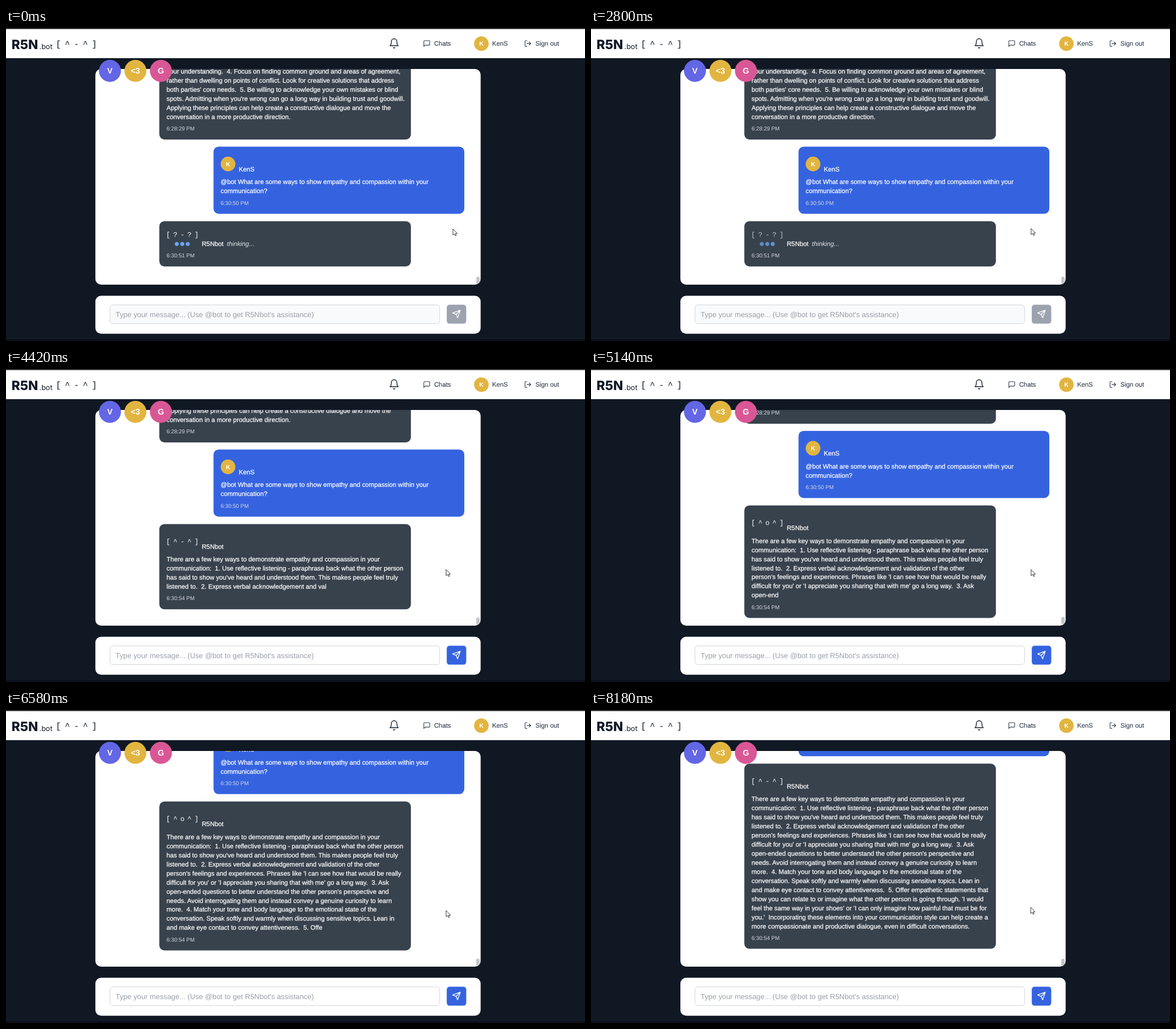
Animation, 1017 px wide and 550 px high, one loop 8.42 s. Source, as an HTML page:

```html
<!DOCTYPE html>
<html lang="en">
<head>
<meta charset="utf-8">
<title>Chat with a bot</title>
<style>
  html, body { margin: 0; width: 100%; height: 100%; overflow: hidden; background: #101823; }
  svg { display: block; }
  text { font: 11.25px "Liberation Sans", Arial, sans-serif; white-space: pre; text-rendering: geometricPrecision; }
  .light { fill: #fff; stroke: #fff; stroke-width: .25px; }
  .nav { fill: #374151; stroke: #374151; stroke-width: .15px; }
  .time { font-size: 9.65px; fill: #d5d9df; }
  .initial { font-weight: bold; fill: #fff; text-anchor: middle; }
  .face { font: 12.2px "Liberation Mono", "DejaVu Sans Mono", monospace; letter-spacing: -.09em; fill: #fff; }
  .icon { fill: none; stroke: #374151; stroke-width: 2; stroke-linecap: round; stroke-linejoin: round; }
</style>
</head>
<body>
<svg id="stage" width="1017" height="550" viewBox="0 0 1017 550">
  <defs>
    <clipPath id="panel"><rect x="157" y="72" width="676.7" height="379" rx="10"/></clipPath>
  </defs>
  <rect width="1017" height="550" fill="#101823"/>
  <rect y="547" width="1017" height="3" fill="#0a101a"/>
  <rect width="1017" height="53" fill="#fff"/>
  <rect width="1017" height="2" fill="#36383c"/>

  <text x="9.7" y="36.5" fill="#111827" style="font:800 22.6px Inter,sans-serif">R5N</text>
  <text x="58.5" y="36.5" fill="#111827" style="font:12.6px Inter,sans-serif">.bot</text>
  <text x="87.6" y="33" class="face" style="font-size:15.4px;fill:#111827">[ ^ - ^ ]</text>

  <g class="icon" transform="translate(672 17.3) scale(.81)">
    <path d="M6 8a6 6 0 0 1 12 0c0 7 3 9 3 9H3s3-2 3-9M10.3 21a1.94 1.94 0 0 0 3.4 0"/>
  </g>
  <g class="icon" transform="translate(732.2 20.5) scale(.57)">
    <path d="M21 15a2 2 0 0 1-2 2H7l-4 4V5a2 2 0 0 1 2-2h14a2 2 0 0 1 2 2z"/>
  </g>
  <text x="752" y="31" class="nav">Chats</text>
  <circle cx="835" cy="27.5" r="12.8" fill="#e2b540"/>
  <text x="835" y="31.2" class="initial" style="font-size:10.5px">K</text>
  <text x="854" y="31" class="nav">KenS</text>
  <g class="icon" transform="translate(910 20.6) scale(.56)">
    <path d="M9 21H5a2 2 0 0 1-2-2V5a2 2 0 0 1 2-2h4M16 17l5-5-5-5M21 12H9"/>
  </g>
  <text x="930" y="31" class="nav">Sign out</text>

  <g clip-path="url(#panel)">
    <rect x="157" y="72" width="677" height="379" fill="#fff"/>
    <rect id="thumb" x="826" y="437" width="6" height="13" rx="3" fill="#c4c6c9"/>
    <g id="feed">
      <g id="earlier">
        <rect x="269.3" y="-400" width="441.9" height="256.5" rx="9" fill="#38424d"/>
      </g>
      <g transform="translate(0 -131)">
        <rect x="364.5" width="440.5" height="118" rx="9" fill="#3563e0"/>
        <circle cx="390" cy="30.6" r="12.9" fill="#e2b540"/>
        <text x="390" y="34.2" class="initial" style="font-size:10.5px">K</text>
        <text x="409" y="43.5" class="light">KenS</text>
        <text x="377" y="66" class="light">@bot What are some ways to show empathy and compassion within your</text>
        <text x="377" y="82" class="light">communication?</text>
        <text x="377" y="102.3" class="time">6:30:50 PM</text>
      </g>
      <rect id="card" x="269.3" width="441.9" height="79.6" rx="9" fill="#38424d"/>
      <text id="face" x="281.3" class="face"></text>
      <text x="344" y="43.3" class="light">R5Nbot</text>
      <g id="thinking">
        <text x="388" y="43.3" fill="#e3e6ea" style="font-style:italic">thinking...</text>
        <g id="dots" fill="#69a6f5"></g>
      </g>
      <g id="reply"></g>
      <text id="stamp" x="282" class="time"></text>
    </g>
  </g>

  <g id="people"></g>

  <rect x="157" y="470.5" width="676.7" height="66.7" rx="10" fill="#fff"/>
  <rect id="field" x="182.7" y="486.6" width="579" height="32.8" rx="5" stroke="#d1d5db"/>
  <text x="192.5" y="507.5" fill="#9a9fa8" style="font-size:12.85px">Type your message... (Use @bot to get R5Nbot's assistance)</text>
  <rect id="send" x="774.2" y="486.2" width="34.2" height="33.4" rx="5"/>
  <g class="icon" style="stroke:#fff" transform="translate(783.2 494.6) scale(.67)">
    <path d="M22 2 15 22 11 13 2 9ZM22 2 11 13"/>
  </g>
  <path id="cursor" d="M0 0V11L2.7 8.7 4.4 12.3 6 11.6 4.4 8.1H7.7Z" fill="#fff" stroke="#22252b" stroke-width=".9"/>
</svg>
<script>
const LOOP = 8420, ANSWER = 3100, DONE = 8050, TICK = 79;
const PITCH = 15.95, REST = 419;

const earlier = [
  "your understanding.  4. Focus on finding common ground and areas of agreement,",
  "rather than dwelling on points of conflict. Look for creative solutions that address",
  "both parties' core needs.  5. Be willing to acknowledge your own mistakes or blind",
  "spots. Admitting when you're wrong can go a long way in building trust and goodwill.",
  "Applying these principles can help create a constructive dialogue and move the",
  "conversation in a more productive direction."
];
const reply = [
  "There are a few key ways to demonstrate empathy and compassion in your",
  "communication:  1. Use reflective listening - paraphrase back what the other person",
  "has said to show you've heard and understood them. This makes people feel truly",
  "listened to.  2. Express verbal acknowledgement and validation of the other",
  "person's feelings and experiences. Phrases like 'I can see how that would be really",
  "difficult for you' or 'I appreciate you sharing that with me' go a long way.  3. Ask",
  "open-ended questions to better understand the other person's perspective and",
  "needs. Avoid interrogating them and instead convey a genuine curiosity to learn",
  "more.  4. Match your tone and body language to the emotional state of the",
  "conversation. Speak softly and warmly when discussing sensitive topics. Lean in",
  "and make eye contact to convey attentiveness.  5. Offer empathetic statements that",
  "show you can relate to or imagine what the other person is going through. 'I would",
  "feel the same way in your shoes' or 'I can only imagine how painful that must be for",
  "you.'  Incorporating these elements into your communication style can help create a",
  "more compassionate and productive dialogue, even in difficult conversations."
];
const whole = reply.join("\n");
const starts = reply.map((_, i) => reply.slice(0, i).reduce((n, s) => n + s.length + 1, 0));
const upTo = s => whole.indexOf(s) + s.length;

// [time, values...]
const typed = [
  [3190, 0], [3718, upTo("paraphrase back")], [5140, upTo("open-end")],
  [5930, upTo("language to the")], [7036, upTo("\nfeel th")],
  [DONE, whole.length], [LOOP, whole.length + 92]
];
const pointer = [
  [80, 785, 353], [830, 779, 352.3], [1340, 779, 352.3], [1900, 773, 352.3],
  [8020, 773, 352.3], [8170, 772.3, 346.7]
];
const drift = [[4600, 0], [5140, 1.7], [5600, 0]];

const $ = id => document.getElementById(id);
function add(parent, tag, attrs, text = "") {
  const el = document.createElementNS("http://www.w3.org/2000/svg", tag);
  for (const k in attrs) el.setAttribute(k, attrs[k]);
  el.textContent = text;
  parent.append(el);
  return el;
}
function at(keys, t) {
  if (t <= keys[0][0]) return keys[0].slice(1);
  for (let i = 1; i < keys.length; i++) {
    const a = keys[i - 1], b = keys[i];
    if (t < b[0]) {
      const p = (t - a[0]) / (b[0] - a[0]);
      return a.slice(1).map((v, j) => v + (b[j + 1] - v) * p);
    }
  }
  return keys[keys.length - 1].slice(1);
}
// share of a scroll step still to go after some ms
const left = age => age < 0 ? 0 : age < 50 ? 1 : Math.exp((50 - age) / 105);

earlier.forEach((s, i) =>
  add($("earlier"), "text", { x: 282, y: -179.5 - (5 - i) * PITCH, class: "light" }, s));
add($("earlier"), "text", { x: 282, y: -159.3, class: "time" }, "6:28:29 PM");
const lines = reply.map((_, i) =>
  add($("reply"), "text", { x: 282, y: 66 + i * PITCH, class: "light" }));
const dots = [300, 309.6, 319.2].map(cx => add($("dots"), "circle", { cx, cy: 40.2, r: 3.5 }));
[["V", 182.6, "#6366e5"], ["<3", 227.3, "#e2b540"], ["G", 272.1, "#da5796"]].forEach(([s, x, fill]) => {
  add($("people"), "circle", { cx: x, cy: 75.4, r: 19.3, fill });
  add($("people"), "text", { x, y: 80.2, class: "initial", style: "font-size:14.2px" }, s);
});

function draw(t) {
  const thinking = t < ANSWER;
  let height = 79.6, over = 0;

  $("thinking").style.display = thinking ? "" : "none";
  $("reply").style.display = thinking ? "none" : "";
  $("face").setAttribute("y", thinking ? 27.3 : 34.4);

  if (thinking) {
    $("face").textContent = "[ ? - ? ]";
    $("face").style.opacity = at([[80, 1], [870, .68]], t)[0];
    dots.forEach((d, i) =>
      d.style.opacity = .84 + .16 * Math.cos(Math.PI * (t - i * 120) / 1000));
  } else {
    const step = 5140 + TICK * Math.floor((t - 5140) / TICK);
    const [count] = at(typed, step);
    const shown = Math.floor(count + 1e-6);
    let rows = 1;
    over = 22.5 * left(t - ANSWER) + at(drift, step)[0];
    starts.forEach((from, i) => {
      lines[i].textContent = reply[i].slice(0, Math.max(0, shown - from));
      if (i && shown > from) {
        rows = i + 1;
        over += PITCH * left((count - from) * 4);
      }
    });
    height = 86.1 + rows * PITCH;
    const open = step < DONE && Math.floor((step - 3700) / 260) & 1;
    $("face").textContent = open ? "[ ^ o ^ ]" : "[ ^ - ^ ]";
    $("face").style.opacity = 1;
  }

  $("card").setAttribute("height", height);
  $("stamp").setAttribute("y", height - 15.8);
  $("stamp").textContent = thinking ? "6:30:51 PM" : "6:30:54 PM";
  $("feed").setAttribute("transform", `translate(0 ${REST + over - height})`);
  $("thumb").setAttribute("y", 437 - over / 12);
  $("field").setAttribute("fill", thinking ? "#f9fafb" : "#fff");
  $("send").setAttribute("fill", thinking ? "#9ca3af" : "#3563e0");
  $("cursor").setAttribute("transform", `translate(${at(pointer, t)})`);
}

const begin = performance.now();
function frame() {
  draw((performance.now() - begin) % LOOP);
  requestAnimationFrame(frame);
}
frame();
</script>
</body>
</html>
```
